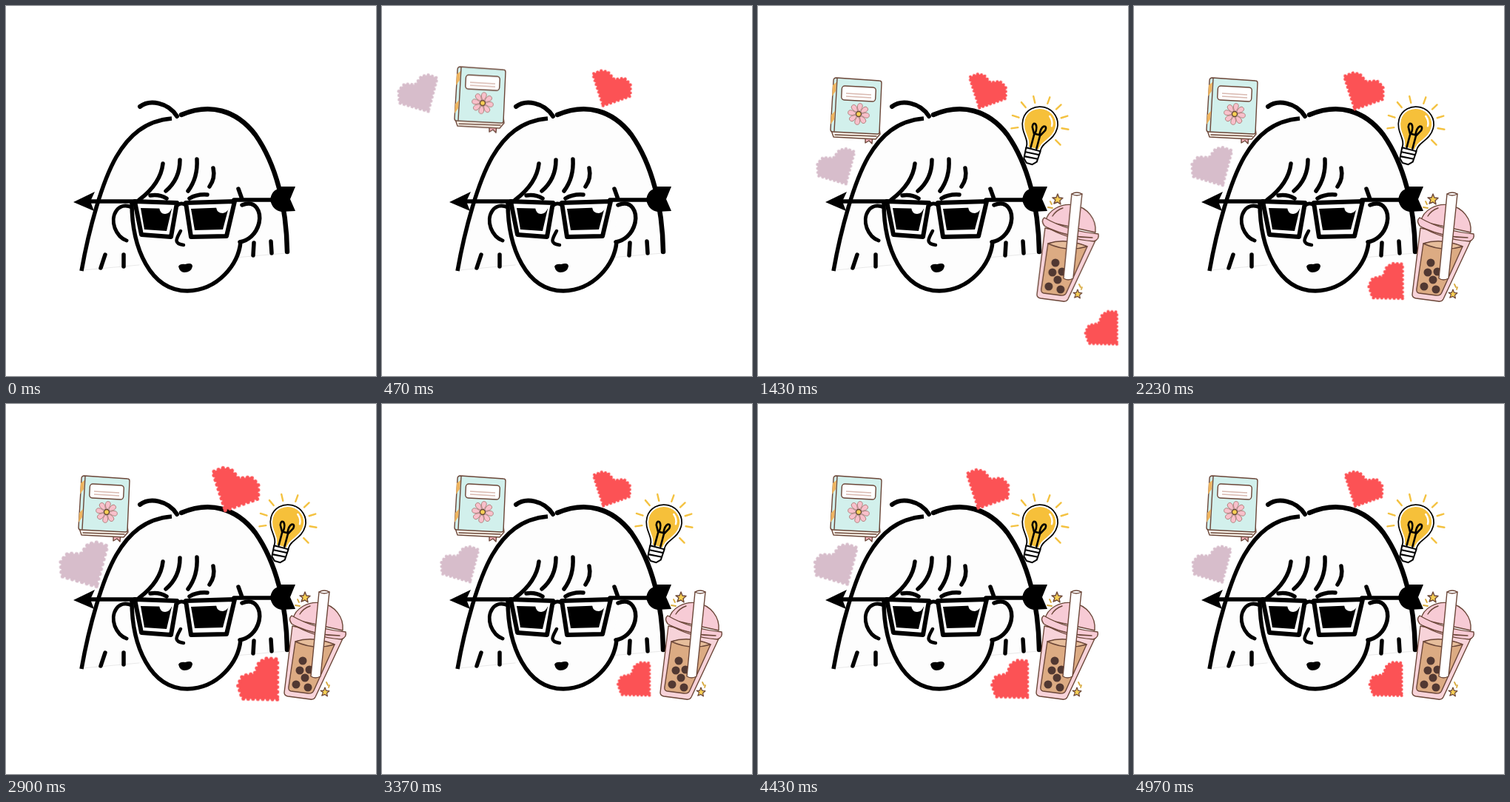
Animation, 500 px wide and 500 px high, one loop 5010 ms. Source, as an HTML page:

```html
<!DOCTYPE html>
<html lang="en">
<head>
<meta charset="utf-8">
<title>Thinking of nice things</title>
<style>
html, body { margin: 0; width: 100%; height: 100%; overflow: hidden; background: #fff; }
svg { display: block; width: 100vw; height: 100vh; }
.line { fill: none; stroke: #000; stroke-width: 5.5; stroke-linecap: round; stroke-linejoin: round; }
.skin { fill: #fdfdfd; }
.brown { stroke: #6b4638; stroke-width: 1.4; stroke-linejoin: round; stroke-linecap: round; }
.move, .pulse { animation: 5010ms linear infinite; }
.pulse { animation-name: pulse; animation-timing-function: cubic-bezier(.37, 0, .63, 1); }
.heart { stroke-width: 5; stroke-linecap: round; stroke-dasharray: 0 6.4; }
.lilac { fill: #d7bdcb; stroke: #d7bdcb; }
.red { fill: #fc5255; stroke: #fc5255; }

/* heartbeat: 900 ms period */
@keyframes pulse {
  0% { transform: scale(.96); }
  2.99%, 20.96%, 38.92%, 56.89%, 74.85%, 92.81% { transform: scale(1.01); }
  11.98%, 29.94%, 47.9%, 65.87%, 83.83% { transform: scale(.79); }
  100% { transform: scale(.81); }
}
@keyframes book {
  0% { transform: translate(0, -195px); animation-timing-function: ease-out; }
  10.58% { transform: translate(0, -11px); }
  13%, 100% { transform: none; }
}
@keyframes lilac {
  0%, 3% { transform: translate(60px, -42px); }
  10.58% { transform: translate(46px, 147px); animation-timing-function: ease-out; }
  14% { transform: translate(53px, 173px); }
  21.96% { transform: translate(53px, 175px); animation-timing-function: ease-in-out; }
  27.5%, 100% { transform: translate(105px, 216.5px); }
}
@keyframes red {
  0%, 3.5% { transform: translate(311px, -42px); animation-timing-function: ease-out; }
  10.2%, 100% { transform: translate(311px, 114px); }
}
@keyframes bulb {
  0%, 11% { transform: translate(60px, -225px); animation-timing-function: ease-out; }
  17%, 100% { transform: none; }
}
@keyframes boba {
  0%, 20% { transform: translate(130px, -140px); animation-timing-function: ease-in-out; }
  28% { transform: translate(1px, 0); }
  32.5%, 100% { transform: none; }
}
@keyframes corner {
  0%, 25% { transform: translate(532px, 431px); }
  28.54% { transform: translate(465px, 435.5px); animation-timing-function: ease-out; }
  32%, 100% { transform: translate(340px, 371.5px); }
}
</style>
</head>
<body>
<svg viewBox="0 0 500 500">
  <defs>
    <path id="heart" d="M26 27L-20 26L-26 8L-20 -4L-4 -7L2 -22L12 -27L26 -26Z"/>
    <path id="petal" d="M0 -3C-5 -9 -4 -14.500 0 -14.500S5 -9 0 -3Z"/>
    <path id="ray" d="M0 -30V-39"/>
    <path id="star" d="M0 -7L2 -2L7 -1.500L3 2L4 7L0 4L-5 6L-3 1L-7 -2L-2 -2Z"/>
    <path id="glass" d="M-8 34C-7 21 -22 16 -22 -1A22 21 0 0 1 22 -1C22 16 7 21 8 34Z"/>
  </defs>

  <g id="face">
    <path class="skin" d="M102 357C113 296 135 220 160 187Q185 157 224 152L236 147C275 130 312 141 338 175C368 220 380 270 380 334L318 340L166 351Z"/>
    <path class="line" style="stroke:#e9e9e9;stroke-width:1" d="M104 357L180 350M310 340L379 334"/>
    <path class="line" style="stroke-linecap:butt" d="M102 358C112 301 130 237 149 204C166 175 188 155 224 152"/>
    <path class="line" style="stroke-width:6.500" d="M237 147C275 131 311 140 337 174C365 214 379 270 380 332"/>
    <path class="line" style="stroke-width:6" d="M181 136C194 126 219 130 231 149"/>
    <path class="line" d="M134 336L128 354M159 336V352M335 320L334 337M358 318L359 334"/>

    <path class="line skin" style="stroke-width:5" d="M170 272C151 264 141 283 147 300Q152 313 163 317"/>
    <path class="skin" d="M170 264C170 325 193 385 245 385S317 331 318 264Z"/>
    <path class="line" d="M319 269C338 261 345 279 342 293C338 309 327 317 316 319"/>
    <path class="line" d="M170 266C170 327 195 385 245 385C287 384 314 349 317 319"/>
    <path class="line" d="M212 213C210 232 197 249 180 262M235 208C235 226 229 239 216 250M258 207C259 224 255 238 246 250M280 219Q283 233 275 244"/>
    <path class="line" d="M195 256Q207 254 217 260M248 260Q258 254 272 255"/>

    <path class="line" d="M110 264H175M308 262H368M314 247L319 261"/>
    <path d="M91 265L120 251L114 264L119 277ZM357 262Q359 248 370 247L372 244H391L384 261L391 277L372 278Q360 276 357 262Z"/>

    <g stroke="#000" stroke-width="6" stroke-linejoin="round" fill="#fff">
      <path d="M174 264L231 266L223 312L183 309Z"/>
      <path d="M243 266L309 264L298 311L250 312Z"/>
      <path d="M231 270Q237 264 244 270" fill="none" stroke-width="5"/>
    </g>
    <path d="M182 273L224 274L217 304L187 302ZM250 274L301 272L293 302L255 303Z"/>
    <path fill="#fff" d="M207 272Q208 281 215 281Q222 280 224 273ZM284 272Q285 280 293 280Q300 279 302 271Z"/>

    <path class="line" style="stroke-width:4.500" d="M236 304C230 315 226 321 240 323"/>
    <path d="M233 352Q235 348 242 349Q252 346 252 352Q250 360 241 360Q235 360 233 352Z"/>
  </g>

  <g class="move" style="animation-name:book">
    <path class="brown" fill="#f5b3bd" d="M145 172L155 174L154 186L150 182L145 185Z"/>
    <path class="brown" fill="#fffaf0" d="M99 168L102 177L159 180L165 173L164 165Z"/>
    <path class="brown" fill="none" d="M104 174L160 176"/>
    <path class="brown" fill="#d2f0ec" d="M106 97L164 101Q167 101 167 104L164 171Q164 173 161 173L101 170Q98 170 98 167L102 101Q102 97 106 97Z"/>
    <path class="brown" fill="none" d="M107 98L103 169"/>
    <path fill="#eeb45f" d="M101 107L106 103L105 115L100 122ZM99 147L104 142L103 153L98 160Z"/>
    <rect class="brown" fill="#fff" x="113" y="109" width="46" height="19" rx="4" transform="rotate(3 136 119)"/>
    <path d="M119 118L153 120M119 122L153 124" stroke="#d9b9b0" stroke-width="1.300"/>
    <g id="flower" transform="translate(136 146)" class="brown" fill="#f8c0cb" style="stroke:#a8746e;stroke-width:.8"></g>
    <circle class="brown" cx="136" cy="146" r="3.500" fill="#f6d055"/>
  </g>

  <g class="move" style="animation-name:lilac"><g class="pulse">
    <use href="#heart" class="heart lilac" transform="translate(-2 -5) rotate(15) scale(1.06)"/>
  </g></g>
  <g class="move" style="animation-name:red"><g class="pulse">
    <use href="#heart" class="heart red" transform="translate(2 -5) scale(-1.02 1.02) rotate(18)"/>
  </g></g>

  <g class="move" style="animation-name:bulb">
    <g id="rays" transform="translate(381 160)" stroke="#f4c241" stroke-width="2.400" stroke-linecap="round"></g>
    <g transform="translate(381 160) rotate(15)" stroke-linejoin="round" stroke-linecap="round">
      <use href="#glass" stroke="#000" stroke-width="5.500"/>
      <use href="#glass" fill="#f6c03a" stroke="#fff" stroke-width="2"/>
      <path d="M-4 33V15L-9 6Q-10 0 -6 1Q-2 4 -3 14H3Q2 4 6 1Q10 0 9 6L4 15V33" fill="none" stroke="#000" stroke-width="2.600"/>
      <path d="M10 -14Q16 -9 16 -2" fill="none" stroke="#fff" stroke-width="2.500"/>
      <path d="M-10 35H10L9 50L4 55H-4L-9 50Z" fill="#fff" stroke="#000" stroke-width="2"/>
      <path d="M-9 41L9 40M-8 47L8 46" stroke="#000" stroke-width="2.200"/>
    </g>
  </g>

  <g class="move" style="animation-name:boba">
    <path class="brown" fill="#f7d3d9" d="M387 300L376 390Q376 394 381 395L411 399Q416 400 418 396L456 315Z"/>
    <path class="brown" fill="#dcab83" d="M391 321Q417 315 444 325L416 387Q414 392 408 391L385 388Q381 387 382 382Z"/>
    <path class="brown" fill="#e6bd9b" d="M391 321Q415 313 444 325Q417 333 391 321Z"/>
    <g fill="#513832">
      <circle cx="401" cy="347" r="5.500"/><circle cx="410" cy="359" r="5.500"/>
      <circle cx="397" cy="360" r="5.500"/><circle cx="404" cy="370" r="5.500"/>
      <circle cx="392" cy="379" r="5.500"/><circle cx="408" cy="383" r="5.500"/>
    </g>
    <path class="brown" fill="#f7cbd5" d="M388 291C390 276 409 266 426 269C444 272 457 288 455 306Z"/>
    <path class="brown" fill="#f7cbd5" d="M386 286Q381 290 386 297Q415 315 453 318Q461 315 459 308Q417 304 386 286Z"/>
    <path class="brown" fill="none" d="M397 284Q402 276 411 273M391 300Q420 313 451 313"/>
    <path class="brown" fill="#fff" d="M423 254Q430 250 437 254L425 368Q418 372 412 368Z"/>
    <path class="brown" fill="none" d="M423 254Q430 258 437 254"/>
    <use href="#star" class="brown" fill="#f6cf55" transform="translate(404 261)"/>
    <use href="#star" class="brown" fill="#f6cf55" transform="translate(431 389) scale(.85)"/>
    <path d="M394 264L396 268M391 272L397 273M433 376L435 380M437 380L436 383" stroke="#d7a93c" stroke-width="1.800" stroke-linecap="round"/>
  </g>

  <g class="move" style="animation-name:corner"><g class="pulse">
    <use href="#heart" class="heart red" transform="scale(1.02)"/>
  </g></g>
</svg>
<script>
const spread = (id, shape, angles) => {
  document.getElementById(id).innerHTML =
    angles.map(a => `<use href="#${shape}" transform="rotate(${a})"/>`).join("");
};
spread("flower", "petal", [...Array(8)].map((_, i) => i * 45 + 10));
spread("rays", "ray", [-98, -72, -40, -13, 20, 47, 73, 100, 135]);
</script>
</body>
</html>
```
